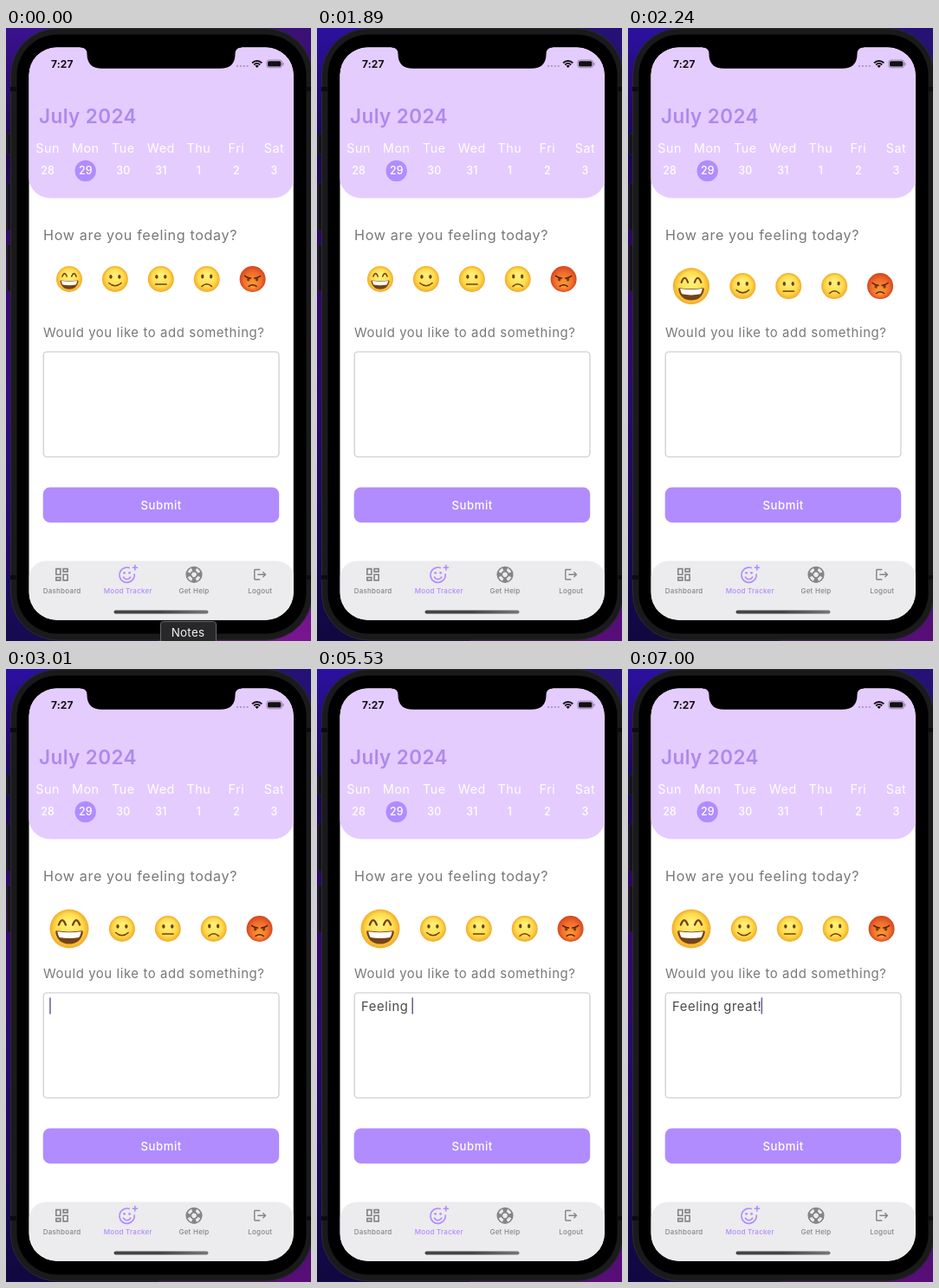
Recreate the animation shown at these times as an HTML page with a canvas. Size 352 px wide and 708 px high, loop 8000 ms.

```html
<!DOCTYPE html>
<html lang="en">
<head>
<meta charset="utf-8">
<title>Mood tracker</title>
<style>
html, body { margin: 0; width: 100%; height: 100%; overflow: hidden; background: #000; }
canvas { display: block; width: 352px; height: 708px; }
</style>
</head>
<body>
<canvas id="stage"></canvas>
<script>
const W = 352, H = 708, LOOP = 8000, STEP = 70;
const canvas = document.getElementById('stage');
const dpr = window.devicePixelRatio || 1;
canvas.width = W * dpr;
canvas.height = H * dpr;
const c = canvas.getContext('2d');

const LILAC = '#e4ccff', VIOLET = '#b18cff', GREY = '#78787a', ICON = '#858588';
const NOTE = 'Feeling great!';
const KEY_TIMES = [3780, 4060, 4200, 4760, 5040, 5110, 5250, 5530, 5950, 6090, 6160, 6230, 6370, 7000];

const clamp = (v) => Math.max(0, Math.min(1, v));

// CSS "ease": cubic-bezier(.25, .1, .25, 1)
function ease(x) {
  if (x <= 0 || x >= 1) return clamp(x);
  const bez = (a, b, s) => 3 * a * s * (1 - s) ** 2 + 3 * b * s * s * (1 - s) + s ** 3;
  let lo = 0, hi = 1;
  for (let i = 0; i < 24; i++) {
    const mid = (lo + hi) / 2;
    if (bez(.25, .25, mid) < x) lo = mid; else hi = mid;
  }
  return bez(.1, 1, lo);
}

function box(x, y, w, h, r, fill, stroke, lw = 1) {
  c.beginPath();
  c.roundRect(x, y, w, h, r);
  if (fill) { c.fillStyle = fill; c.fill(); }
  if (stroke) { c.strokeStyle = stroke; c.lineWidth = lw; c.stroke(); }
}

function dot(x, y, r, fill) {
  c.beginPath();
  c.arc(x, y, r, 0, Math.PI * 2);
  c.fillStyle = fill;
  c.fill();
}

function line(d, color, lw, cap = 'round') {
  c.strokeStyle = color;
  c.lineWidth = lw;
  c.lineCap = cap;
  c.stroke(new Path2D(d));
}

function shape(d, color) {
  c.fillStyle = color;
  c.fill(new Path2D(d));
}

function at(x, y, s, draw) {
  c.save();
  c.translate(x, y);
  c.scale(s, s);
  draw();
  c.restore();
}

function setFont(size, weight, track) {
  c.font = `${weight} ${size}px Inter, "Open Sans", sans-serif`;
  c.letterSpacing = size * track + 'px';
}

function text(s, x, y, size, color, { weight = 400, align = 'left', track = .04 } = {}) {
  setFont(size, weight, track);
  c.textAlign = align;
  c.fillStyle = color;
  c.fillText(s, x, y);
}

function gradient(x0, y0, x1, y1, colors) {
  const g = c.createLinearGradient(x0, y0, x1, y1);
  colors.forEach((col, i) => g.addColorStop(i / (colors.length - 1), col));
  return g;
}

function backdrop(t) {
  const early = t < 1890;
  c.fillStyle = early
    ? gradient(0, 0, 0, H, ['#3a1290', '#1d0848', '#390a6c', '#330c84', '#220c70', '#160a50'])
    : gradient(0, 0, 0, H, ['#2c10a0', '#1a0850', '#34096a', '#2a0a70', '#1c0a5c', '#100840']);
  c.fillRect(0, 0, W, H);
  c.fillStyle = early
    ? gradient(0, 0, 0, H, ['#3b1178', '#250a55', '#3f0c70', '#7a1592'])
    : gradient(0, 0, 0, H, ['#261276', '#1c0a48', '#360c66', '#580e78']);
  c.fillRect(W / 2, 0, W / 2, H);
}

function phone() {
  for (const [y, h] of [[122, 24], [179, 55], [250, 54]]) {
    box(1.2, y, 8, h, 2, '#141417', '#29292e', .8);
  }
  box(5.5, .5, 348, 706.5, 54, '#1a1a1c', '#2b2b2f', 1);
  box(12.5, 7.5, 334, 692, 47, '#000');
  c.fillStyle = '#0c0c0e';
  for (const y of [68, 632]) {
    c.fillRect(5, y, 7, 5);
    c.fillRect(347, y, 5, 5);
  }
}

function status() {
  text('7:27', 52, 45.5, 12, '#111', { weight: 700, track: .01 });
  for (let i = 0; i < 4; i++) dot(267 + i * 3.9, 44, 1.1, '#a58fc0');
  at(289.7, 46, 1, () => {
    c.strokeStyle = '#111';
    c.lineWidth = 1.9;
    c.lineCap = 'butt';
    for (const r of [5, 8]) {
      c.beginPath();
      c.arc(0, 0, r, -Math.PI * .75, -Math.PI * .25);
      c.stroke();
    }
    shape('M0 0L-2.2 -2.3Q0 -4 2.2 -2.3Z', '#111');
  });
  box(300.8, 37, 17.8, 8.8, 2.6, null, '#8f80a2', .9);
  box(302, 38.2, 15.4, 6.4, 1.6, '#111');
  box(319.4, 40, 1.1, 3.2, .6, '#8f80a2');
}

function header() {
  box(26, 0, 307, 196.5, [0, 0, 25, 25], LILAC);
  text('July 2024', 38, 110, 22.5, '#ad8aec', { weight: 600, track: .018 });
  dot(91.7, 165, 12.2, VIOLET);
  ['Sun', 'Mon', 'Tue', 'Wed', 'Thu', 'Fri', 'Sat'].forEach((day, i) => {
    const x = 48.2 + i * 43.55, opt = { align: 'center' };
    text(day, x, 144, 14.3, '#fff', opt);
    text(i < 4 ? 28 + i : i - 3, x, 169.3, 12.4, '#fff', { ...opt, weight: 500, track: .01 });
  });
  status();
}

// Faces are drawn in a circle of radius 1.
const INK = '#6f4014';
const eyes = (y, ry) => {
  c.fillStyle = INK;
  for (const x of [-.33, .33]) {
    c.beginPath();
    c.ellipse(x, y, .11, ry, 0, 0, Math.PI * 2);
    c.fill();
  }
};
const FACES = [
  () => {
    line('M-.54 -.2Q-.36 -.68 -.18 -.2M.18 -.2Q.36 -.68 .54 -.2', INK, .1);
    const mouth = 'M-.66 .1Q0 .2 .66 .1Q.72 .11 .7 .22Q.56 .78 0 .78Q-.56 .78 -.7 .22Q-.72 .11 -.66 .1Z';
    shape(mouth, '#754319');
    shape('M-.61 .14Q0 .24 .61 .14Q.58 .33 .5 .44Q0 .54 -.5 .44Q-.58 .33 -.61 .14Z', '#fff');
  },
  () => { eyes(-.18, .16); line('M-.48 .3Q0 .74 .48 .3', INK, .1); },
  () => { eyes(-.18, .16); line('M-.42 .4H.42', INK, .1); },
  () => { eyes(-.2, .16); line('M-.38 .56Q0 .2 .38 .56', INK, .1); },
  () => {
    eyes(.04, .13);
    line('M-.6 -.24Q-.4 -.08 -.14 -.06M.6 -.24Q.4 -.08 .14 -.06', '#5a1c0a', .1);
    line('M-.3 .56Q0 .34 .3 .56', '#5a1c0a', .1);
  }
];

function face(i, x, y, r) {
  at(x, y, r, () => {
    const angry = i === 4;
    const g = c.createRadialGradient(0, angry ? .5 : -.3, .1, 0, 0, 1);
    const tones = angry ? ['#fb9a33', '#f06d2b', '#d4461f'] : ['#fff07a', '#ffdb4c', '#f2ac2a'];
    [0, .65, 1].forEach((p, k) => g.addColorStop(p, tones[k]));
    dot(0, 0, 1, g);
    FACES[i]();
  });
}

function moods(t) {
  const k = ease((t - 2088) / 300);
  const y = 290 + 10 * k;
  FACES.forEach((_, i) => {
    face(i, 73 + i * 52.9 + (i ? 8 * k : 0), y, i ? 15 : 15 + 7.5 * k);
  });
}

function form(t) {
  text('How are you feeling today?', 43, 245, 16.15, GREY);
  moods(t);
  text('Would you like to add something?', 43, 357, 14.9, GREY);
  box(43.2, 374, 271.8, 121.3, 4, '#fff', '#c6c6c8', 1.1);

  const typed = NOTE.slice(0, KEY_TIMES.filter((k) => t >= k).length);
  text(typed, 51, 394.5, 14.8, '#49494c');
  if (t >= 3010) {
    c.fillStyle = '#665aa0';
    c.fillRect(50.2 + c.measureText(typed).width, 379.5, 1.5, 19);
  }

  box(42.7, 530.5, 272.5, 40.7, 8, VIOLET);
  text('Submit', 179.2, 555.5, 13.2, '#fff', { weight: 500, align: 'center' });
}

function dashboardIcon() {
  for (const [x, y, w, h] of [[4, 4, 6, 8], [4, 16, 6, 4], [14, 4, 6, 4], [14, 12, 6, 8]]) {
    box(x, y, w, h, 0, null, ICON, 2);
  }
}

function moodIcon() {
  c.strokeStyle = VIOLET;
  c.lineWidth = 1.7;
  c.beginPath();
  c.arc(0, 0, 8.7, -.15, Math.PI * 1.62);
  c.stroke();
  dot(-3, -2.4, 1.35, VIOLET);
  dot(3, -2.4, 1.35, VIOLET);
  line('M-4.4 2Q-3 5 0 5Q3 5 4.4 2', VIOLET, 1.6, 'butt');
  line('M9.3 -11.6V-5.2M6.1 -8.4H12.5', VIOLET, 1.6, 'butt');
}

function helpIcon() {
  const ring = (r, lw, from = 0, to = Math.PI * 2) => {
    c.beginPath();
    c.arc(0, 0, r, from, to);
    c.lineWidth = lw;
    c.stroke();
  };
  c.strokeStyle = ICON;
  c.lineCap = 'butt';
  ring(8.8, 1.6);
  ring(3.8, 1.8);
  for (let i = 0; i < 4; i++) {
    const mid = Math.PI * i / 2;
    ring(6.4, 4.6, mid - .38, mid + .38);
  }
}

function logoutIcon() {
  shape('M17 7l-1.4 1.4L18.2 11H8v2h10.2l-2.6 2.6L17 17l5-5zM4 5h8V3H4c-1.1 0-2 .9-2 2v14c0 1.1.9 2 2 2h8v-2H4z', ICON);
}

function tabs() {
  box(26.5, 615.5, 306, 70, [20, 20, 0, 0], '#ecebed');
  at(54.5, 621.3, .83, dashboardIcon);
  at(139.6, 631.7, 1, moodIcon);
  at(217, 631.3, 1, helpIcon);
  at(284.6, 622.6, .72, logoutIcon);
  ['Dashboard', 'Mood Tracker', 'Get Help', 'Logout'].forEach((label, i) => {
    text(label, 64.6 + i * 76.2, 652.7, 8, i === 1 ? VIOLET : ICON,
      { weight: 500, align: 'center', track: .03 });
  });
  box(124.5, 672.6, 109, 4, 2, gradient(124, 0, 234, 0, ['#444446', '#444446', '#77777a']));
}

function tooltip(t) {
  const alpha = clamp(1 - (t - 280) / 350);
  if (!alpha) return;
  c.globalAlpha = alpha;
  box(178.5, 685.5, 64, 30, 3, '#28282b', '#68686c', 1);
  text('Notes', 210, 703, 13.4, '#f2f2f4', { align: 'center', track: .02 });
  c.globalAlpha = 1;
}

function draw(t) {
  c.setTransform(dpr, 0, 0, dpr, 0, 0);
  backdrop(t);
  phone();
  c.save();
  c.beginPath();
  c.roundRect(26.5, 22.5, 305.3, 661.2, 32);
  c.clip();
  c.fillStyle = '#fff';
  c.fillRect(26, 22, 307, 663);
  header();
  form(t);
  tabs();
  c.restore();
  // notch with flared shoulders
  shape('M86 19H272V22.5Q264.5 22.5 264.5 30Q264.5 46.8 247 46.8H111Q93.5 46.8 93.5 30Q93.5 22.5 86 22.5Z', '#000');
  tooltip(t);
}

const start = performance.now();
function tick() {
  const t = (performance.now() - start) % LOOP;
  draw(Math.floor(t / STEP) * STEP);
  requestAnimationFrame(tick);
}
tick();
</script>
</body>
</html>
```
